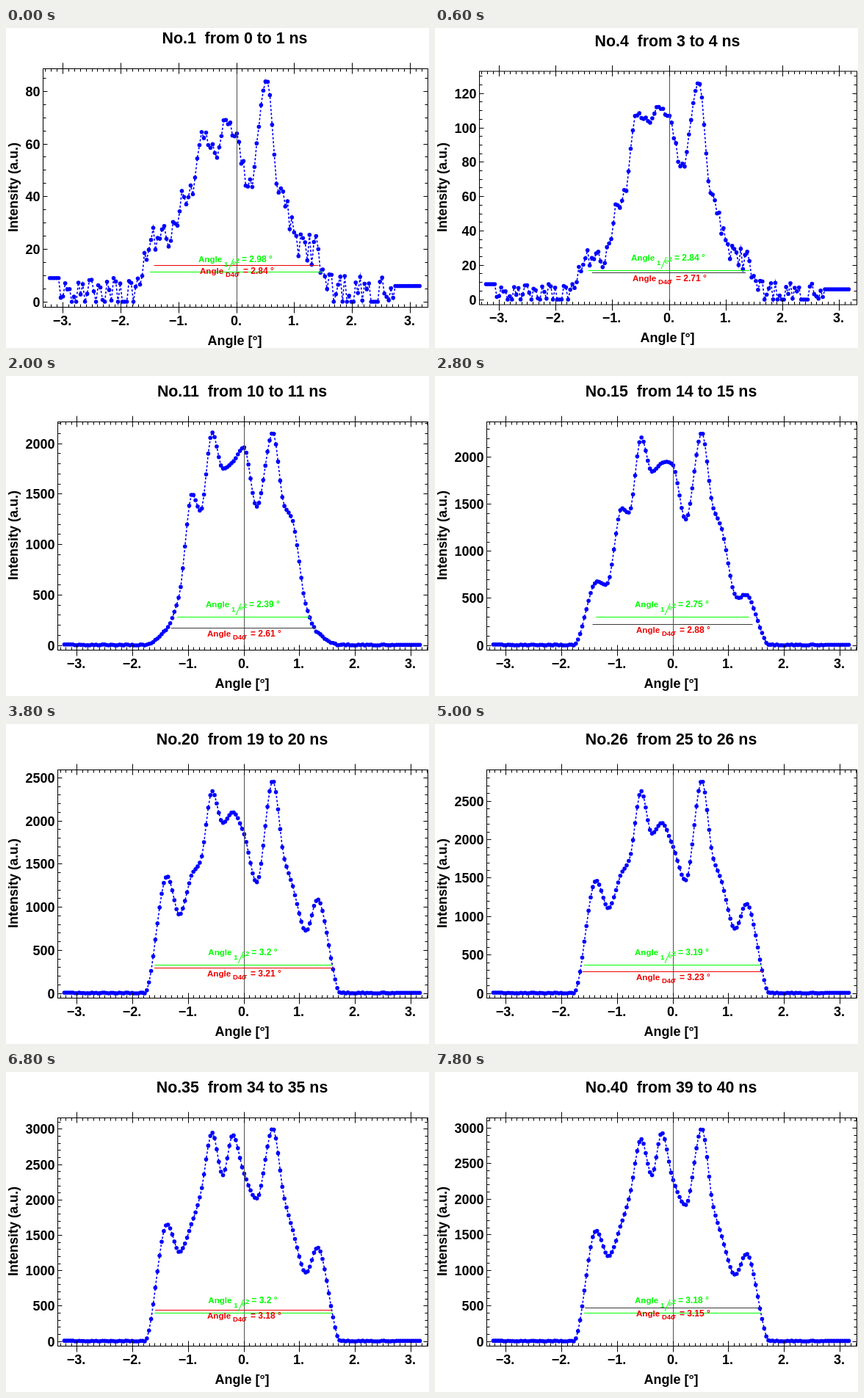
Write an HTML page with a canvas that moves like this. It is 576 by 436 pixels and loops after 8 s.

```html
<!DOCTYPE html>
<html lang="en">
<head>
<meta charset="utf-8">
<title>Angular intensity</title>
<style>
html, body { margin: 0; width: 100%; height: 100%; overflow: hidden; background: #fff; }
canvas { display: block; }
</style>
</head>
<body>
<canvas id="stage" width="576" height="436"></canvas>
<script>
const ctx = document.getElementById('stage').getContext('2d');
const FONT = '"Liberation Sans", Arial, sans-serif';
const BLUE = '#0000ff', RED = '#f00000', GREEN = '#00ff00', DARK = '#3a3a3a';
const COUNT = 169, FIRST = -3.228, STEP = 6.39 / (COUNT - 1);
const STEP_MS = 200, STEPS = 40, RIGHT = 574.5;

// Angles of the beam's lobes and dips; each profile gives their heights in percent.
const ANGLES = [-1.78, -1.38, -1.16, -0.93, -0.78, -0.57, -0.38, -0.2, 0, 0.23, 0.52, 0.72, 0.87, 1.12, 1.32, 1.74];
const KEYS = [
  { n: 1, max: 84.3, e2: 2.98, d4: 2.84, bar: 50, tint: RED,
    profile: [27, 28, 42, 48, 72, 64, 78, 72, 49, 100, 50, 39, 19, 20] },
  { n: 4, max: 126.5, e2: 2.84, d4: 2.71, bar: 36.5, tint: DARK,
    profile: [18, 17, 39, 48, 84, 81, 87, 83, 59, 100, 50, 36, 17, 16] },
  { n: 11, max: 2110, e2: 2.39, d4: 2.61, bar: 24, tint: DARK,
    profile: [8, 24, 71, 63, 100, 83, 86, 93, 65, 100, 66, 59, 18, 6] },
  { n: 20, max: 2470, e2: 3.2, d4: 3.21, bar: 35, tint: RED,
    profile: [55, 37, 56, 62, 95, 80, 85, 75, 52, 100, 64, 51, 29, 44] },
  { n: 26, max: 2770, e2: 3.19, d4: 3.23, bar: 30, tint: RED,
    profile: [53, 40, 56, 63, 95, 75, 80, 69, 53, 100, 64, 53, 30, 42] },
  { n: 35, max: 3010, e2: 3.2, d4: 3.18, bar: 43, tint: RED,
    profile: [55, 42, 56, 69, 98, 78, 97, 79, 67, 100, 68, 53, 32, 44] },
  { n: 40, max: 2995, e2: 3.18, d4: 3.15, bar: 46, tint: DARK,
    profile: [52, 40, 55, 68, 95, 78, 98, 76, 64, 100, 64, 50, 31, 41] }
];

const mix = (a, b, f) => a + (b - a) * f;
const snap = v => Math.floor(v) + 0.5;
const angleAt = i => FIRST + i * STEP;

// Margins shrink as the axis numbers gain digits.
function layout(digits) {
  const d = digits - 2, left = 30.5 + 10 * digits;
  return {
    left, top: 55.5 + 3.5 * d, bottom: 380.5 - 3.5 * d,
    zero: 373 - 3 * d, peak: 71 + 3 * d,
    x0: 314 + 5 * d, unit: 78.8 - 1.525 * d,
    mid: (left + RIGHT) / 2 - 1, title: 21 + 3.5 * d
  };
}

// Detector background in counts: the same for every time slice.
function makeNoise(seed) {
  return Array.from({ length: COUNT }, (_, i) => {
    seed = (seed * 16807) % 2147483647;
    if (i < 5) return 9;
    if (i > 156) return 6;
    return 13 * seed / 2147483647 - 3;
  });
}
const noise = makeNoise(4217);

// Monotone cubic through the profile's points.
function sample(profile) {
  const h = [0, ...profile.map(p => p / 100), 0], last = h.length - 1;
  const rise = k => (h[k + 1] - h[k]) / (ANGLES[k + 1] - ANGLES[k]);
  const slope = k => {
    if (k === 0 || k === last) return 0;
    const a = rise(k - 1), b = rise(k);
    return a * b <= 0 ? 0 : 2 * a * b / (a + b);
  };
  return noise.map((_, i) => {
    const x = angleAt(i), k = ANGLES.findLastIndex(a => a <= x);
    if (k < 0 || k >= last) return 0;
    const w = ANGLES[k + 1] - ANGLES[k], u = (x - ANGLES[k]) / w, v = 1 - u;
    return v * v * (1 + 2 * u) * h[k] + u * u * (3 - 2 * u) * h[k + 1]
      + w * u * v * (v * slope(k) - u * slope(k + 1));
  });
}
KEYS.forEach(key => key.shape = sample(key.profile));

// Intensity grows geometrically between two keys.
function stateAt(n) {
  const k = Math.min(KEYS.length - 2, KEYS.findLastIndex(key => key.n <= n));
  const a = KEYS[k], b = KEYS[k + 1], f = (n - a.n) / (b.n - a.n);
  const max = a.max * (b.max / a.max) ** f, w = (max - a.max) / (b.max - a.max);
  const values = noise.map((e, i) => {
    const s = mix(a.shape[i] * a.max, b.shape[i] * b.max, w) / max;
    return Math.max(0, s * max + e * (1 - s * s));
  });
  return {
    values, max,
    e2: mix(a.e2, b.e2, f), d4: mix(a.d4, b.d4, f), bar: mix(a.bar, b.bar, f),
    tint: (f < 0.5 ? a : b).tint
  };
}

function text(str, x, y, size, align = 'left', color = '#000', style = 'bold') {
  ctx.font = `${style} ${size}px ${FONT}`;
  ctx.textAlign = align;
  ctx.fillStyle = color;
  ctx.fillText(str, x, y);
}

function line(x1, y1, x2, y2, color = '#000') {
  ctx.strokeStyle = color;
  ctx.lineWidth = 1;
  ctx.beginPath();
  ctx.moveTo(x1, y1);
  ctx.lineTo(x2, y2);
  ctx.stroke();
}

function tickStep(max) {
  const raw = max / 6.5, mag = 10 ** Math.floor(Math.log10(raw));
  const lead = [1, 2, 5, 10].find(m => m * mag >= raw);
  return { step: lead * mag, parts: lead === 2 ? 4 : 5 };
}

function drawAxes(L, step, parts, scale) {
  ctx.strokeStyle = '#000';
  ctx.lineWidth = 1;
  ctx.strokeRect(L.left, L.top, RIGHT - L.left, L.bottom - L.top);
  for (let i = -33; i <= 33; i++) {
    const x = snap(L.x0 + i / 10 * L.unit), major = i % 10 === 0;
    if (x <= L.left || x >= RIGHT) continue;
    const out = major ? 8 : 0, inside = major ? 7 : 4;
    line(x, L.top - out, x, L.top + inside);
    line(x, L.bottom - inside, x, L.bottom + out);
    if (major) text(`${i < 0 ? '−' : ''}${Math.abs(i / 10)}.`, x - 1, L.bottom + 24, 18, 'center');
  }
  for (let j = 0; ; j++) {
    const v = j * step / parts, y = L.zero - v * scale, major = j % parts === 0;
    if (y < L.top + 1) break;
    const len = major ? 6 : 4;
    line(L.left, snap(y), L.left + len, snap(y));
    line(RIGHT - len, snap(y), RIGHT, snap(y));
    if (major) text(String(v), L.left - 4, y + 6.5, 18, 'right');
  }
}

function drawCurve(L, values, scale) {
  const pts = values.map((v, i) => [L.x0 + angleAt(i) * L.unit, L.zero - v * scale]);
  ctx.strokeStyle = ctx.fillStyle = BLUE;
  ctx.lineWidth = 1.6;
  ctx.setLineDash([3, 2.5]);
  ctx.beginPath();
  pts.forEach(p => ctx.lineTo(...p));
  ctx.stroke();
  ctx.setLineDash([]);
  for (const [x, y] of pts) {
    ctx.beginPath();
    ctx.arc(x, y, 2.8, 0, 7);
    ctx.fill();
  }
}

// Writes "Angle = value" with a gap for the index; returns the gap's left edge.
function caption(deg, x, y, color) {
  const num = String(+deg.toFixed(2)), left = x + (4 - num.length) * 3.3;
  text('Angle', left, y, 11.6, 'left', color);
  text(`= ${num} °`, left + 59, y, 12, 'left', color);
  return left + 35;
}

function drawWidths(L, s) {
  const span = (y, deg, color) => {
    const half = deg * L.unit / 2, cx = L.x0 - 0.5;
    line(cx - half, y, cx + half, y, color);
  };
  const yE = Math.round(L.zero - (L.zero - L.peak) / Math.E ** 2) + 0.5;
  const yD = snap(L.zero - s.bar);
  span(yE, s.e2, GREEN);
  span(yD, s.d4, s.tint);

  const y = yE - 13.5, x = caption(s.e2, L.x0 - 52, y, GREEN);
  text('1', x, y + 6, 9.5, 'left', GREEN);
  line(x + 6, y + 11, x + 13, y - 5, GREEN);
  text('e', x + 11, y + 4, 9.5, 'left', GREEN, 'italic');
  text('2', x + 16, y + 1, 9, 'left', GREEN);

  const yd = yD + 11, xd = caption(s.d4, L.x0 - 50, yd, RED);
  text('D4', xd, yd + 4, 9.5, 'left', RED);
  text('σ', xd + 12, yd + 4, 10, 'left', RED, 'italic bold');
}

function draw(n) {
  const s = stateAt(n), { step, parts } = tickStep(s.max);
  const L = layout(String(Math.floor(s.max * 1.02 / step) * step).length);
  const scale = (L.zero - L.peak) / s.max;

  ctx.fillStyle = '#fff';
  ctx.fillRect(0, 0, 576, 436);
  drawCurve(L, s.values, scale);
  line(snap(L.x0), L.top, snap(L.x0), L.bottom, '#505050');
  drawAxes(L, step, parts, scale);
  drawWidths(L, s);
  text(`No.${n}  from ${n - 1} to ${n} ns`, L.mid, L.title, 21.33, 'center');
  text('Angle [°]', L.mid, L.bottom + 51, 18, 'center');
  ctx.save();
  ctx.translate(16, (L.top + L.bottom) / 2 - 1);
  ctx.rotate(-Math.PI / 2);
  text('Intensity (a.u.)', 0, 0, 18, 'center');
  ctx.restore();
}

let shown = 0;
function tick() {
  const n = 1 + Math.floor(performance.now() / STEP_MS) % STEPS;
  if (n !== shown) draw(shown = n);
  requestAnimationFrame(tick);
}
tick();
</script>
</body>
</html>
```
